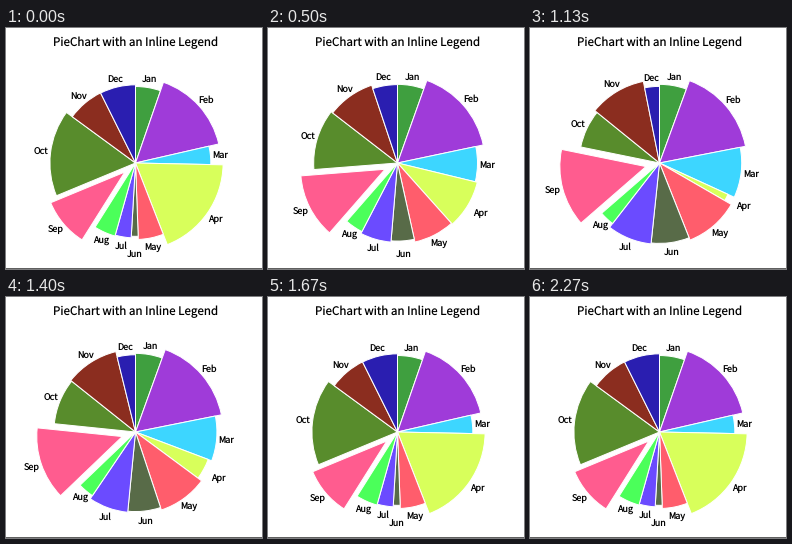
These frames come from a looping animation (256 px wide and 241 px high, 2.31 s). A matplotlib script:

```python
import numpy as np
import matplotlib.pyplot as plt
from matplotlib.animation import FuncAnimation
from matplotlib.patches import Rectangle, Wedge

plt.rcParams["text.hinting"] = "none"
plt.rcParams["font.family"] = "Noto Sans CJK JP"

W, H, DPI = 256, 241, 64
FRAMES, STEP = 70, 33
PX = 72 / DPI  # points per pixel
CENTER = np.array([129.5, 135.0])
R_MAX, R_SLOPE = 87.6, 0.23
EXPLODED, OFFSET = 8, 14

MONTHS = "Jan Feb Mar Apr May Jun Jul Aug Sep Oct Nov Dec".split()
COLORS = ["#3f9f3f", "#9f3bd9", "#3dd6ff", "#d8ff5b", "#ff5d6c", "#586b48",
          "#6b4bff", "#4bff5a", "#ff5c8f", "#588c2c", "#8b2d1f", "#2a1eb0"]

# Slice boundaries in degrees clockwise from the top
FIRST = np.array([0, 19.1, 77.1, 91.2, 158.7, 177.9, 183.3,
                  195.7, 212.2, 247.5, 306.2, 333.5, 360])
SECOND = np.array([0, 20, 79, 114.6, 120, 158.4, 186,
                   217.8, 229, 281.5, 309, 348.8, 360])
# Extra label distance for the narrowest slice of each state
PUSH_FIRST = np.where(np.arange(12) == 5, 9, 0)
PUSH_SECOND = np.where(np.arange(12) == 3, 9, 0)

MOVE, GO, BACK = 300, 350, 1350


def mix(a, b, k):
    return a + (b - a) * k


def progress(ms):
    """0 for the first data set, 1 for the second."""
    go = np.clip((ms - GO) / MOVE, 0, 1)
    back = np.clip((ms - BACK) / MOVE, 0, 1)
    return go - back


def heading(deg):
    a = np.radians(deg)
    return np.array([np.sin(a), -np.cos(a)])


fig = plt.figure(figsize=(W / DPI, H / DPI), dpi=DPI, facecolor="white")
ax = fig.add_axes([0, 0, 1, 1])
ax.set_xlim(0, W)
ax.set_ylim(H, 0)
ax.axis("off")

ax.text(129.5, 17.8, "PieChart with an Inline Legend", ha="center",
        fontsize=11.6 * PX, color="black")
ax.add_patch(Rectangle((0, H - 1), W, 1, facecolor="#606060", lw=0))

slices = [ax.add_patch(Wedge(CENTER, R_MAX, 0, 1, facecolor=c,
                             edgecolor="white", lw=PX)) for c in COLORS]
labels = [ax.text(0, 0, m, ha="center", fontsize=9 * PX, color="black")
          for m in MONTHS]


def draw(i):
    k = progress(i * STEP + 14)
    edges = mix(FIRST, SECOND, k)
    push = mix(PUSH_FIRST, PUSH_SECOND, k)
    spans = np.diff(edges)
    radii = R_MAX - R_SLOPE * (spans.max() - spans)
    for n, (wedge, label) in enumerate(zip(slices, labels)):
        out = heading((edges[n] + edges[n + 1]) / 2)
        shift = OFFSET if n == EXPLODED else 0
        wedge.set_center(tuple(CENTER + out * shift))
        wedge.set_radius(radii[n])
        wedge.set_theta1(edges[n] - 90)
        wedge.set_theta2(edges[n + 1] - 90)
        gap = 8.5 + 1.5 * abs(out[0]) + push[n]
        x, y = CENTER + out * (shift + radii[n] + gap)
        label.set_position((x, y + 3.2))
    return slices + labels


anim = FuncAnimation(fig, draw, frames=FRAMES, interval=STEP,
                     repeat=True, repeat_delay=0)
plt.show()
```
